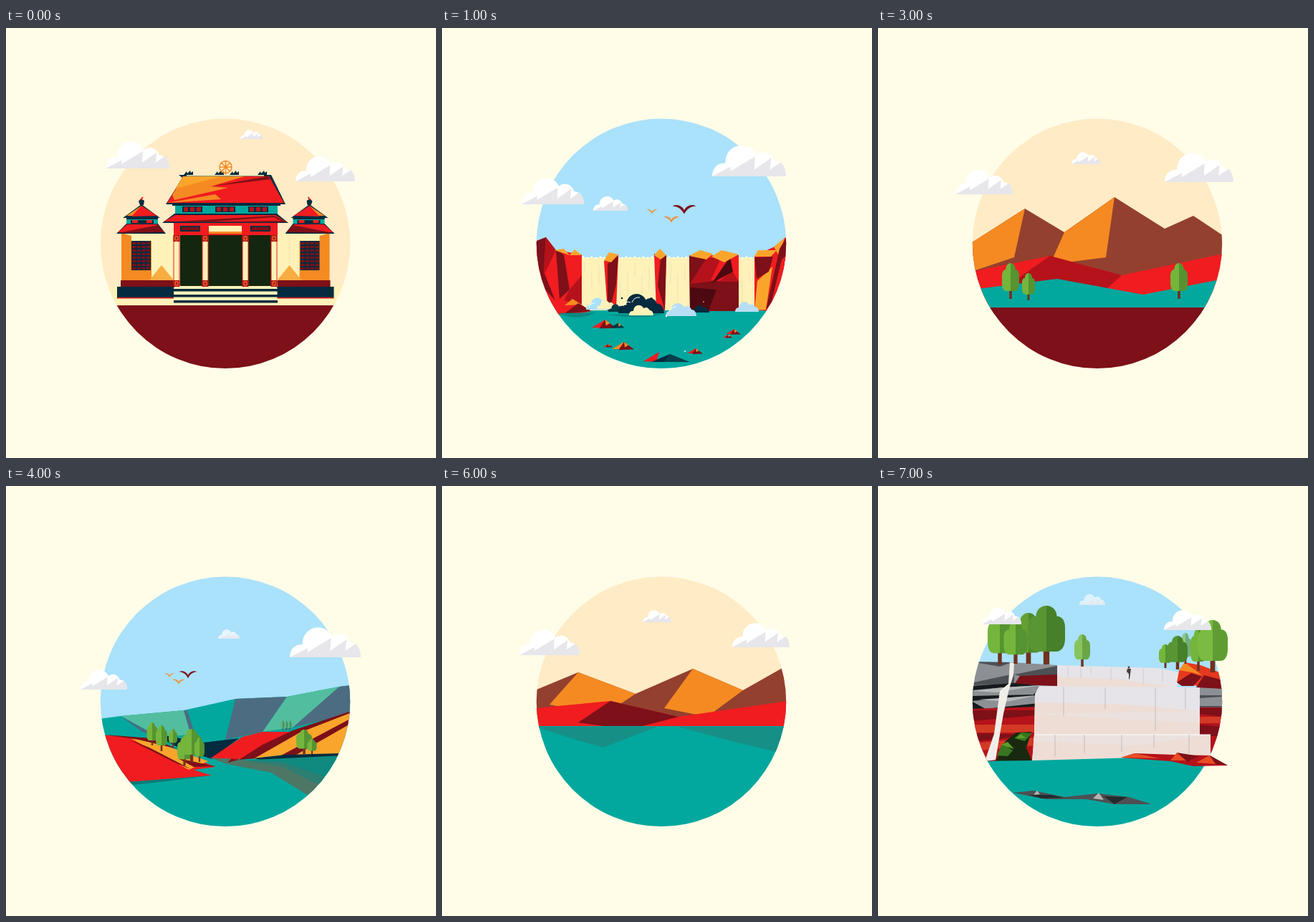
Animation of 600x600 px, one loop 8000 ms. Source, as an HTML page with a canvas:

```html
<!DOCTYPE html>
<html lang="en">
<head>
<meta charset="utf-8">
<title>Round landscapes</title>
<style>
html, body { margin: 0; width: 100%; height: 100%; overflow: hidden; background: #fffce8; }
canvas { display: block; }
</style>
</head>
<body>
<canvas id="stage" width="600" height="600"></canvas>
<script>
const ctx = document.getElementById('stage').getContext('2d');
const SLIDE_MS = 1000;

const paper = '#fffce8', peach = '#ffebc5', sky = '#aae1fb', cream = '#fff2b8', white = '#fff';
const teal = '#02a89e', navy = '#042b3f', red = '#f01c20', crimson = '#b5121b', maroon = '#7d1018';
const orange = '#f58a22', amber = '#f9a52c', brown = '#93402f', slate = '#4c6c82', mint = '#52be9f';

const fill = (color, d) => { ctx.fillStyle = color; ctx.fill(new Path2D(d)); };
const line = (color, width, d) => {
  ctx.strokeStyle = color; ctx.lineWidth = width; ctx.stroke(new Path2D(d));
};
const rect = (color, x, y, w, h) => { ctx.fillStyle = color; ctx.fillRect(x, y, w, h); };
const disc = (color, x, y, r) => {
  ctx.fillStyle = color; ctx.beginPath(); ctx.arc(x, y, r, 0, 7); ctx.fill();
};
function at(x, y, sx, sy, draw) {
  ctx.save(); ctx.translate(x, y); ctx.scale(sx, sy); draw(); ctx.restore();
}
function inCircle(color, draw) {
  ctx.save();
  disc(color, 306, 300.8, 174.2);
  ctx.clip();
  draw();
  ctx.restore();
}

// x is the left edge, y the flat bottom.
const puff = (x, y, w, color) => at(x, y, w / 100, w / 100, () =>
  fill(color, 'M0 0C0-10 6-19 18-18A22 22 0 0 1 60-29C70-37 81-31 84-21C95-21 100-10 100 0Z'));
function cloud(x, y, w, alpha = 1) {
  ctx.globalAlpha = alpha;
  puff(x, y, w, white);
  at(x, y, w / 100, w / 100, () =>
    fill('#e6e6eb', 'M0 0L25-13V-7L58-27L57-9L80-25L78-9L93-19Q100-12 100 0Z'));
  ctx.globalAlpha = 1;
}
const bird = (x, y, w, color) => at(x, y, w / 100, w / 100, () =>
  fill(color, 'M-50-14C-30-24-8-14 0 4C8-14 30-24 50-14C30-14 12-4 0 20C-12-4-30-14-50-14Z'));
function tree(x, base, w, h, light = '#74b53c', dark = '#559430') {
  const half = 'M0-100C-16-100-28-92-28-82C-42-82-50-74-50-64V-44C-50-30-40-22-26-22H0Z';
  at(x, base, w / 100, h / 100, () => {
    fill('#70331d', 'M-8 0V-30H8V0Z');
    fill(light, half);
    ctx.scale(-1, 1);
    fill(dark, half);
  });
}

function pavilion() {
  rect(orange, 161, 286, 56, 66);
  fill(cream, 'M161 286H217V332L203 350V297H175V290Z');
  fill(cream, 'M217 286H234V352L217 331Z');
  fill('#f9ac42', 'M217 331L234 352H200Z');
  rect(navy, 175, 297, 27, 41);
  for (let y = 299; y < 336; y += 5) rect(maroon, 176, y, 25, 3);
  line(navy, 1.5, 'M188.500 297V338M182 297V338M195 297V338');
  rect(maroon, 160, 352, 75, 10);
  rect(navy, 155, 361, 79, 15);
  rect(red, 155, 376, 79, 1.5);
  rect(teal, 168, 263, 44, 11);
  rect(navy, 168, 264, 44, 3);
  rect(navy, 174, 268, 32, 5);
  rect(red, 176, 268, 8, 4); rect(red, 196, 268, 8, 4);
  fill(navy, 'M163 265L189 246L215 265Z');
  fill(orange, 'M168 262L189 248L192 262Z');
  fill(red, 'M189 248L211 262L175 263Z');
  fill(navy, 'M154 287L168 273H212L223 287Z');
  fill(red, 'M156 285L169 274H211L221 285Z');
  fill(maroon, 'M156 286L212 275L221 285Z');
  fill(navy, 'M185 242L188 238L193 241L192 247H187Z');
  line(red, 2, 'M188 240L191 236');
}

function temple() {
  inCircle(peach, () => {
    rect(cream, 130, 361, 350, 26);
    rect(maroon, 130, 387, 350, 90);
    pavilion();
    at(612.5, 0, -1, 1, pavilion);
    rect(cream, 234, 284, 145, 77);
    for (const [x, w] of [[243, 31], [282, 48], [338, 32]]) rect('#14260f', x, 289, w, 71);
    for (const x of [238, 278, 334, 374]) {
      line(red, 1, `M${x - 4} 290V358M${x + 4} 290V358`);
      for (const y of [289, 352]) {
        rect(crimson, x - 4.5, y, 9, 9);
        line(orange, 1, `M${x - 2} ${y + 2}h4v5h-4Z`);
      }
    }
    for (const y of [364, 372, 380]) rect(navy, 234, y, 145, 3.5);
  });
  rect(red, 234, 272, 145, 17);
  rect(cream, 283, 276, 46, 8);
  rect(orange, 283, 284, 46, 3);
  for (const x of [243, 341]) { rect(navy, x, 276, 28, 8); rect(maroon, x + 2, 278, 24, 4); }
  rect(teal, 236, 246, 143, 14);
  rect(navy, 232, 245, 151, 3);
  for (const x of [246, 292, 338]) {
    rect(navy, x, 249, 28, 8);
    for (let i = 0; i < 3; i++) rect(crimson, x + 2 + i * 9, 250, 6, 6);
  }
  fill(navy, 'M218 272L235 259H378L394 272Z');
  fill(red, 'M220 270L236 261H376L392 271Z');
  fill(maroon, 'M240 270L374 262L392 271Z');
  fill(red, 'M290 270L374 264L384 269Z');
  fill(navy, 'M241 205H370L390 246H223L246 209Z');
  fill(red, 'M247 207H367L388 244H225Z');
  fill(orange, 'M247 207H333L286 221L310 223L235 240L232 233Z');
  fill(amber, 'M247 207H300L237 224Z');
  fill(maroon, 'M286 221L365 207L369 211Z');
  fill(orange, 'M225 244L292 232L300 239Z');
  rect(cream, 252, 205, 108, 1.5);
  for (const x of [248, 291, 312, 351]) fill(navy, `M${x} 205l4-5 1 3 4-4 1 3 3-2v5Z`);
  line(orange, 1.5, 'M298 194a8.500 8.500 0 1 0 17 0a8.500 8.500 0 1 0-17 0M298 194h17M306.500 185.500v19M300.500 188l12 12M312.500 188l-12 12');
  cloud(139, 196, 89); cloud(404, 214, 83); cloud(327, 155, 31);
}

function smallRock(x, y, w, left = red, right = maroon) {
  at(x, y, w / 100, w / 100, () => {
    fill(left, 'M0 0L55-32L70 0Z');
    fill(right, 'M30 4L55-32L100 2Z');
    fill(orange, 'M55-32L75-18L58-8Z');
  });
}
function waterfall() {
  inCircle(sky, () => {
    rect(cream, 190, 320, 255, 76);
    ctx.globalAlpha = .55;
    for (let i = 0; i < 24; i++) {
      const x = 199 + i * 10, y = 325 + i * 17 % 29;
      line('#d7d8bd', 1, `M${x} ${y}v${16 + i * 7 % 23}`);
    }
    ctx.globalAlpha = 1;
    for (let x = 197; x < 440; x += 6) disc(white, x, 319 + x % 4 * .6, 1.3);
    rect(teal, 130, 394, 355, 85);

    fill(red, 'M130 298L145 292L159 310L195 316V387L168 400H130Z');
    fill(maroon, 'M130 298L145 292L142 340L158 380L130 350ZM159 310L170 316L178 365L164 378Z');
    fill(crimson, 'M145 292L159 310L142 345ZM178 365L195 345V387L170 380Z');
    fill(amber, 'M157 310L170 308L178 317ZM178 317L185 309L195 317Z');
    fill(red, 'M160 397L182 378L208 395L190 399Z');
    fill(orange, 'M171 387L182 378L195 386Z');
    fill(maroon, 'M170 399L190 384L208 395Z');

    fill(red, 'M226 325L246 317L243 394H231Z');
    fill(maroon, 'M231 329L246 318L243 357L234 394H231Z');
    fill(amber, 'M226 324L233 313L246 316L236 327Z');
    fill(red, 'M296 315L313 317L311 394H299Z');
    fill(maroon, 'M305 322L313 317L311 394L301 360Z');
    fill(amber, 'M296 317L304 308L313 317L305 323Z');

    fill(red, 'M345 317L414 317V395H346Z');
    fill(maroon, 'M345 318L369 321L362 352L414 354V395H346Z');
    fill(crimson, 'M369 321L390 320L374 354L346 357ZM386 354L405 339L414 354Z');
    fill('#4c0911', 'M376 357L402 319L406 340L380 354ZM346 362L383 365L372 394H346Z');
    fill(amber, 'M345 318L360 310L378 315L369 323ZM376 319L390 310L414 316L394 327Z');

    fill(red, 'M436 318L464 305L482 290V395L436 394Z');
    fill(amber, 'M436 319L441 310L467 310L459 319ZM436 394L440 353L461 333L452 393ZM463 305L478 293L470 318Z');
    fill(maroon, 'M436 320L462 319L456 340L439 350ZM471 308L482 290V355L452 393Z');
    fill(red, 'M474 323L482 316V390L458 390Z');

    fill('#078b83', 'M162 398Q190 410 215 397ZM230 400Q285 408 310 398Z');
    smallRock(209, 418, 34); smallRock(235, 418, 20, navy, '#063b45');
    smallRock(225, 445, 13); smallRock(237, 448, 31, orange); smallRock(342, 454, 22);
    smallRock(396, 427, 21); smallRock(392, 432, 13);
    fill(red, 'M281 465L303 452L299 466Z');
    fill(navy, 'M292 466L318 455L345 466Z');
    fill('#063f4c', 'M318 455L345 466H310Z');

    puff(201, 393, 39, sky); puff(216, 392, 28, cream);
    puff(232, 396, 25, '#063b45');
    puff(246, 398, 64, navy);
    puff(261, 401, 34, cream);
    puff(349, 397, 24, navy); puff(312, 402, 43, '#b7def5'); puff(409, 396, 33, '#b7def5');
    line(white, 1, 'M253 388Q256 380 263 383M265 383Q268 375 276 376M205 390Q207 383 213 384M317 396Q320 389 327 389');
    disc(navy, 292, 378, 2); disc(navy, 251, 377, 1.3); disc(cream, 228, 378, 1.5);
    disc(white, 313, 402, 1.2); disc(white, 339, 451, 1); disc(orange, 365, 382, 1);
  });
  bird(293, 256, 16, orange); bird(338, 253, 33, maroon); bird(320, 267, 22, orange);
  cloud(377, 207, 103); cloud(111, 246, 87); cloud(211, 255, 48);
}

function lake() {
  inCircle(peach, () => {
    fill(brown, 'M130 258L240 261L280 274L302 270L318 274H368L468 236L482 230V301H130Z');
    fill('#e6954f', 'M163 259L240 261V290L180 289Z');
    fill(orange, 'M130 258H146L138 291H130ZM280 274L302 270L300 288L278 285Z');
    fill('#e17c32', 'M146 259L163 259L182 290L147 276Z');
    fill(brown, 'M145 259H163L181 289L153 290Z');
    fill('#df4931', 'M300 286L324 275H368L330 291Z');
    fill(brown, 'M301 287L352 275H368L326 292Z');
    fill(orange, 'M326 293L368 274L468 236L385 293Z');
    fill(red, 'M130 293L190 289L280 285L328 293L328 301H130Z');
    fill(maroon, 'M130 293L155 289L210 300H130ZM190 289L250 291L218 300ZM275 286L328 293L318 301ZM328 293L482 292V301H323Z');
    fill(red, 'M328 300L375 292L405 300ZM448 300L482 294V301Z');
    rect(teal, 130, 301, 355, 180);
    fill('#168f87', 'M130 302H190L158 342H145L150 324L130 311ZM193 302H285L265 329L240 340L242 314ZM288 302H325L368 326L318 327L300 317ZM345 302H482V370L398 326Z');
    fill('#0b9b92', 'M365 302H482V338Z');
    fill('#0a7772', 'M130 301H482V304L300 303L240 306Z');
  });
  fill('#0b7470', 'M286 390Q345 382 400 389L392 386H300Z');
  fill(navy, 'M285 377L296 380H388L402 378L393 385H297Z');
  line(navy, 1.4, 'M384 349L369 380');
  disc(navy, 369, 363, 3);
  fill(cream, 'M364 365H370L370 374H364Z');
  fill(maroon, 'M364 373H370L368 381H364Z');
  line(navy, 1.5, 'M367 366L374 371');
  fill(red, 'M378 380L379 371H386L388 380Z');
  fill(white, 'M376 371L382 365L388 371Z');
  ctx.globalAlpha = .6;
  fill('#a47d62', 'M364 389H370V398L366 403ZM378 389H388L385 398H379Z');
  fill(navy, 'M366 402H371V408ZM376 398H387L382 402Z');
  ctx.globalAlpha = 1;
  cloud(333, 218, 65); cloud(232, 238, 47); cloud(297, 255, 21);
}

function redHills() {
  inCircle(peach, () => {
    fill(brown, 'M130 300L205 252L260 285L330 236L400 280L440 262L482 290V390H130Z');
    fill(orange, 'M130 300L205 252L190 320L130 340ZM260 285L330 236L318 320L240 330Z');
    fill(red, 'M130 340L240 318L340 345L482 315V400H130Z');
    fill(crimson, 'M240 318L340 345L290 390L180 360Z');
    fill(teal, 'M130 365L250 350L370 372L482 350V410H130Z');
    rect(maroon, 130, 390, 355, 90);
    tree(185, 378, 24, 50); tree(210, 380, 18, 38); tree(420, 378, 24, 50);
  });
  cloud(108, 232, 80); cloud(400, 215, 96); cloud(270, 190, 40);
}

function valley() {
  inCircle(sky, () => {
    fill(teal, 'M130 325L160 321L248 313L320 297L392 294L465 280L482 278V480H130Z');
    fill(mint, 'M160 321L248 313L258 347L214 350Z');
    fill(slate, 'M160 321L218 353L190 343ZM248 313L253 313L267 357L258 347ZM320 297L392 294L358 343L306 354ZM465 280L482 278V317L388 340Z');
    fill(mint, 'M392 294L465 280L400 337L358 343Z');
    fill(navy, 'M205 345L275 358L325 352L287 381L240 365Z');
    fill(red, 'M130 347L200 353L292 392L262 396L287 404L172 413L130 380Z');
    fill(amber, 'M172 351L203 355L282 384L255 396Z');
    fill(maroon, 'M138 347L203 352L240 367L185 354ZM172 354L200 365L258 395L240 388ZM240 380L292 391L262 392Z');
    fill('#087b76', 'M172 413L287 404L215 413L177 417Z');
    fill(red, 'M285 380L330 350L358 343H408L330 381Z');
    fill(maroon, 'M325 382L358 361L400 341L482 314V324L350 380Z');
    fill(amber, 'M345 381L410 344L482 316V374Z');
    fill(maroon, 'M380 378L482 324V331L405 375Z');
    fill(navy, 'M345 380L390 375L467 373V377L360 383Z');
    fill('#10897f', 'M325 383L470 376L450 410L437 417Z');
    fill('#4d7665', 'M284 379L328 382L391 389L437 417L422 432L370 400L308 388Z');
    fill('#2c7f72', 'M330 383L385 385L448 407L437 417L385 391Z');
    fill(maroon, 'M309 386L317 378L325 382Z');
    fill(red, 'M313 380L318 377L323 382Z');
    tree(204, 362, 15, 32); tree(217, 370, 16, 36); tree(233, 364, 12, 25);
    tree(249, 390, 20, 40); tree(259, 385, 27, 46); tree(270, 385, 14, 34);
    tree(416, 374, 22, 34); tree(427, 374, 13, 21);
    for (const x of [386, 391, 396]) tree(x, 341, 5, 14, '#5fb277', '#40916a');
  });
  bird(228, 264, 14, orange); bird(254, 263, 26, maroon); bird(241, 273, 18, orange);
  cloud(396, 239, 99); cloud(104, 284, 65); cloud(296, 213, 30, .7);
}

function storey(y) {
  rect(orange, 130, y, 60, 52); rect(orange, 322, y, 62, 52);
  rect(navy, 130, y, 60, 8); rect(navy, 320, y, 64, 8);
  rect(cream, 190, y, 132, 52);
  for (const x of [165, 331]) {
    rect(cream, x, y + 25, 18, 18);
    rect(crimson, x + 3, y + 28, 12, 12);
    fill(maroon, `M${x + 3} ${y + 40}l12-12v12Z`);
  }
  for (const x of [134, 352]) {
    rect(red, x, y + 24, 27, 28);
    rect(navy, x + 7, y + 30, 13, 22);
    line(maroon, 1, `M${x} ${y + 30}h27M${x + 4} ${y + 24}v28M${x + 23} ${y + 24}v28`);
  }
  for (const x of [205, 299]) {
    rect(red, x, y + 12, 9, 40);
    rect(cream, x, y + 19, 9, 2);
  }
}
function railing(y) {
  rect(cream, 130, y, 275, 15);
  for (let x = 137; x < 400; x += 26.8) {
    fill(amber, `M${x} ${y + 14}l26-11v11Z`);
    rect(teal, x - 2, y - 3, 5, 18);
    rect(navy, x - 3, y - 3, 3, 16);
  }
  rect(teal, 400, y - 3, 5, 18);
  rect(navy, 403, y - 4, 2, 19);
  rect(maroon, 130, y + 15, 275, 10);
}
function stiltHouse() {
  inCircle(peach, () => {
    fill(maroon, 'M130 230L165 204L188 206V230Z');
    fill(red, 'M130 220L163 204L188 206Z');
    fill(red, 'M326 210L400 195L398 224L326 229Z');
    fill(maroon, 'M326 224L399 204L398 224L326 229Z');
    storey(230); storey(306);
    fill(red, 'M187 195L256 208V230H187Z');
    fill(maroon, 'M187 230L256 208L326 195V230Z');
    fill(red, 'M256 208L326 195L256 224Z');
    rect(teal, 226, 234, 61, 48);
    rect(amber, 221, 239, 35, 10); rect(red, 256, 239, 35, 10);
    rect(red, 234, 254, 44, 28); rect(navy, 244, 254, 23, 28);
    line(maroon, 1, 'M239 254V282M273 254V282');
    rect(teal, 226, 317, 61, 41); rect(red, 226, 317, 61, 12);
    line(cream, 1, 'M226 323H287M236 317V329M246 317V329M256 317V329M266 317V329M276 317V329');
    rect(red, 234, 332, 44, 24); rect(navy, 244, 332, 23, 24);
    railing(281); railing(357);
    rect(maroon, 130, 372, 275, 8);
    rect(navy, 225, 346, 66, 16);
    fill(amber, 'M227 349L256 347L256 361H227Z');
    fill(cream, 'M227 361L258 348H290V361Z');
    rect(teal, 256, 342, 5, 18);
    fill(red, 'M222 362H294L298 374H218Z');
    fill(maroon, 'M218 374L294 362L298 374Z');
    for (const x of [188, 241, 289, 338, 380]) {
      rect(teal, x, 380, 5, 25); fill(navy, `M${x} 380h5l-2 25h-3Z`);
    }
    for (const [a, b] of [[212, 181], [301, 338]]) {
      line(navy, 2, `M${a} 376L${b} 405M${a + 5} 376L${b + 6} 405`);
      for (let i = 0; i < 6; i++) rect(navy, a + (b - a) * i / 6, 378 + i * 4.7, 7, 2.5);
    }
    rect(navy, 130, 402.5, 355, 5);
    rect(maroon, 130, 407, 355, 75);
    line(navy, 3, 'M425 317V388M458 317V388M423 289V317M460 289V317');
    line(navy, 2, 'M425 322L458 354M458 322L425 354M425 354L458 387M458 354L425 387M425 354H458M425 387H458');
    rect(maroon, 424, 300, 36, 16); rect(red, 424, 300, 36, 4);
    rect(navy, 416, 315, 49, 3);
    fill(red, 'M420 266L463 265L466 289H416Z');
    fill(maroon, 'M417 289L463 265L466 289Z');
  });
  cloud(344, 160, 68); cloud(160, 186, 53); cloud(394, 208, 25);
}

function bay() {
  inCircle(peach, () => {
    fill(brown, 'M130 285L190 260L270 290L350 255L420 285L482 250V335H130Z');
    fill(orange, 'M190 260L270 290L225 320L150 305ZM350 255L420 285L370 322L310 310Z');
    fill(red, 'M130 310L235 300L330 322L482 300V340H130Z');
    fill(maroon, 'M235 300L330 322L260 340L190 330Z');
    rect(teal, 130, 335, 355, 145);
    fill('#168f87', 'M130 336H300L225 365L180 352ZM330 336H482V375L400 355Z');
  });
  cloud(108, 236, 84); cloud(405, 225, 80); cloud(280, 190, 40);
}

function cascade() {
  const gray = '#8c9094', darkGray = '#4d5054', foam = '#e6e4e8', blush = '#eeddd5';
  const rust = '#d33a25';
  inCircle(sky, () => {
    fill(gray, 'M130 246L187 246L250 250V285H130Z');
    fill(darkGray, 'M130 245L187 246L170 252ZM190 263L250 251V264L205 267ZM134 274L190 262V276L134 278Z');
    fill(maroon, 'M198 265L250 263V279L190 277Z');
    fill('#171a1c', 'M130 279L190 275L228 279V312H130Z');
    fill(gray, 'M130 285L175 281L228 278L217 291L130 293ZM130 300L218 292L224 303L150 311Z');
    fill('#b6b9ba', 'M130 286L175 281L228 278L165 288ZM140 298L218 293L180 301Z');
    fill(crimson, 'M130 311L220 308V386H130Z');
    fill(maroon, 'M130 313H220V320L130 328ZM130 345L218 347L130 357Z');
    fill(rust, 'M130 333H220V344H130ZM130 359L218 351V362L130 370Z');

    rect(darkGray, 449, 280, 33, 30);
    fill(gray, 'M449 281H482V292H449ZM449 296L482 294V307H449Z');
    rect(crimson, 449, 309, 33, 80);
    fill(maroon, 'M449 310H482V322L449 318ZM449 333L482 336V349H449Z');
    rect(rust, 449, 322, 33, 9);

    fill(foam, 'M250 250L390 254L421 260L417 283H250Z');
    fill(blush, 'M250 266L340 270L417 281V284H250Z');
    line('#c9c6c7', .7, 'M265 252V266M283 252V268M297 252V262M325 254V270M347 254V263M370 255V277M397 257V273');
    fill(foam, 'M225 279L449 281V347H464L463 379L215 384L218 345L219 290Z');
    fill(blush, 'M219 302L350 305L449 314V347L464 348V379L215 384L218 350Z');
    fill('#ebe2df', 'M219 318L449 314V330L350 326ZM218 347H464L360 362L217 356Z');
    line(white, 1.2, 'M219 347L464 347');
    line('#b5b3b6', .8, 'M259 280V321M317 281V311M387 281V342M429 281V311M247 347V377M288 347V373M340 347V371M385 347V366M434 347V374');

    fill('#e5391f', 'M420 258L428 246L450 250L482 262V283L449 280L434 276L417 274Z');
    fill(orange, 'M420 257L428 246L452 264L438 260Z');
    fill(maroon, 'M417 274L437 261L452 266L440 279L424 279ZM455 264L482 271V283L444 281Z');

    fill('#f1eeea', 'M184 246L190 247L189 264L183 283L175 318L164 382L149 384L162 346L170 286L182 276Z');
    fill('#19290f', 'M164 384L178 356L193 344L214 343L207 365L215 384Z');
    fill('#38761f', 'M166 376L174 359L188 369L181 377ZM190 352L200 344L215 345L205 356Z');
    fill('#5b9d2e', 'M172 361L181 357L190 367ZM193 352L199 346L207 352Z');
    fill(teal, 'M130 384L216 383L470 376H485V480H130Z');
  });
  tree(170, 249, 34, 72); tree(210, 248, 42, 71, '#659f33', '#4f8a2a');
  tree(235, 249, 52, 82, '#579632', '#47802a'); tree(192, 248, 33, 58);
  tree(285, 252, 22, 45, '#86c45c', '#68a645');
  tree(429, 248, 17, 43, '#8cc78b', '#6fb077');
  tree(401, 254, 18, 33); tree(418, 256, 28, 47, '#579632', '#47802a');
  tree(447, 258, 22, 59); tree(467, 260, 42, 73, '#7bbb41', '#5f9d33');
  fill(crimson, 'M339 379L358 373L414 375L463 376L488 390L440 391L408 384Z');
  fill('#e94c24', 'M339 379L358 373L393 380ZM408 383L417 372L439 383ZM444 386L462 376L473 388Z');
  fill(maroon, 'M417 372L448 377L432 385ZM463 376L488 390L471 388Z');
  fill(darkGray, 'M188 428L217 425L260 434L307 429L350 434L382 444L330 444L290 437L235 437Z');
  fill('#232b2d', 'M210 431L242 431L260 435L228 436ZM315 433L348 434L330 444Z');
  fill('#b7b4b1', 'M217 431L222 425L226 430ZM300 436L308 428L315 438Z');
  disc('#463c38', 350, 253, 1.5);
  fill('#463c38', 'M348 255H353L351 269L350 270L350 262L347 259Z');
  cloud(145, 193, 55); cloud(399, 201, 66); cloud(281, 166, 36, .6);
}

const slides = [temple, waterfall, lake, redHills, valley, stiltHouse, bay, cascade];
const start = performance.now();
let shown = -1;
function play() {
  const index = Math.floor((performance.now() - start) / SLIDE_MS) % slides.length;
  if (index !== shown) {
    rect(paper, 0, 0, 600, 600);
    slides[index]();
    shown = index;
  }
  requestAnimationFrame(play);
}
play();
</script>
</body>
</html>
```
